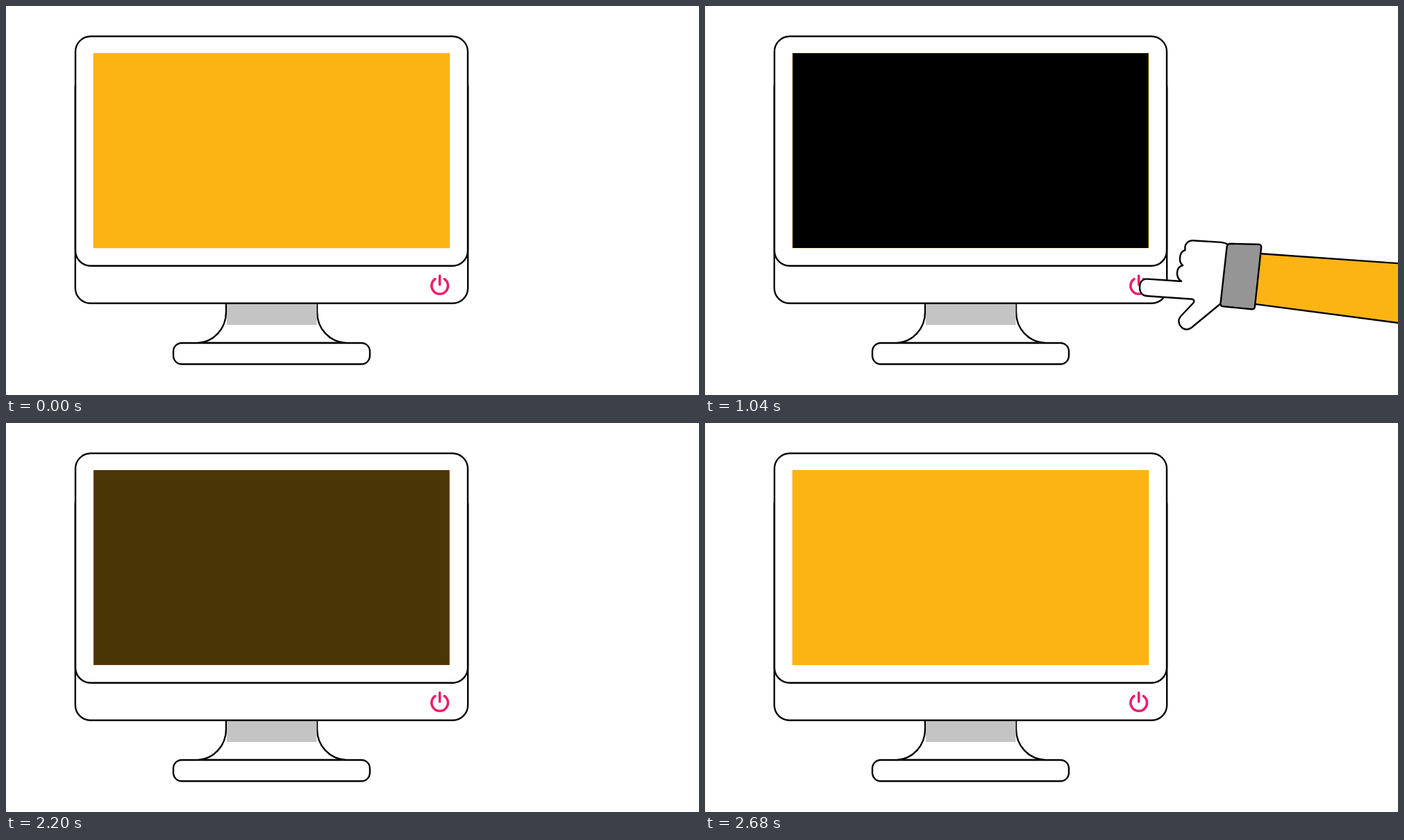
These frames come from a looping animation (998 px wide and 561 px high, 3000 ms). An HTML page:

```html
<!DOCTYPE html>
<html lang="en">
<head>
<meta charset="utf-8">
<title>Power off</title>
<style>
  html, body { margin: 0; width: 100%; height: 100%; overflow: hidden; background: #fff; }
  svg { display: block; width: 100vw; height: 100vh; }
  .line { fill: #fff; stroke: #000; stroke-width: 2.4; stroke-linejoin: round; stroke-linecap: round; }
  .power { fill: none; stroke: #ee1c6f; stroke-width: 3.6; stroke-linecap: round; }
  .orange { fill: #fcb415; }
  .cuff { fill: #959595; }
</style>
</head>
<body>
<svg viewBox="0 0 998 561">
  <!-- stand -->
  <path class="line" d="M317 428V441C317 466 299 484 277 486H489C466 484 448 466 448 441V428"/>
  <rect x="318" y="429" width="129.5" height="31" fill="#c4c4c4"/>
  <rect class="line" x="241" y="486" width="283" height="30.5" rx="12"/>

  <!-- monitor -->
  <rect class="line" x="99.8" y="95" width="565.4" height="333.8" rx="22"/>
  <rect class="line" x="100" y="43.8" width="565" height="331" rx="22"/>
  <rect class="orange" x="125.7" y="67.8" width="513.5" height="281.4"/>
  <rect id="shade" x="126.2" y="68" width="512.4" height="281" opacity="0"/>
  <path class="power" d="M624.7 389V402M618 393.8A11.8 11.8 0 1 0 631.4 393.8"/>

  <!-- arm -->
  <g id="arm">
    <path class="line orange" d="M798 357L1400 399.6V510L790 429.6Z"/>
    <path class="line" d="M636 393.6L686 397C678 392 677 377 688 374C682 370 682 355 691.5 352
      C690 344 695 338 703 338.2L741 340.6C748 341 751 342 754 345L744 428L701 463.5
      C696 467.5 690 467.5 686 463C681 457.500 681 452.500 685 447.500L703 428.500Q706 425 702 422.800
      L637 418.300C630 418 626 413 626 406C626 398 630 393.500 636 393.600Z"/>
    <path class="line cuff" d="M757 342.800L797 343.800Q801.500 344 801 348.500L791.800 433.500
      Q791.300 437.700 787 437.300L746 433.300Q742 432.800 742.400 429L751.500 347.500Q752 342.800 757 342.800Z"/>
  </g>
</svg>
<script>
  const LOOP = 3000, STEP = 40;
  const TRAVEL = 378, MOVE = 850;
  const REACH_START = 2, PULL_START = 1000;
  const OFF_AT = 1040, FADE_START = 2000, FADE_TIME = 680;

  const arm = document.getElementById('arm');
  const shade = document.getElementById('shade');
  const clamp = v => Math.min(1, Math.max(0, v));
  const ease = v => { const u = clamp(v); return u * u * (3 - 2 * u); };

  // Distance of the fingertip from the button press
  function armOffset(t) {
    return t < PULL_START
      ? TRAVEL * (1 - ease((t - REACH_START) / MOVE))
      : TRAVEL * ease((t - PULL_START) / MOVE);
  }

  function darkness(t) {
    return t < OFF_AT ? 0 : 1 - clamp((t - FADE_START) / FADE_TIME);
  }

  function draw(time) {
    const t = Math.floor((time % LOOP) / STEP) * STEP;
    const x = armOffset(t);
    arm.setAttribute('transform', `translate(${(x - 2.4).toFixed(2)} 0)`);
    arm.setAttribute('visibility', x > TRAVEL - 2 ? 'hidden' : 'visible');
    shade.setAttribute('opacity', darkness(t).toFixed(4));
  }

  const start = performance.now();
  function tick() {
    draw(performance.now() - start);
    requestAnimationFrame(tick);
  }
  tick();
</script>
</body>
</html>
```
